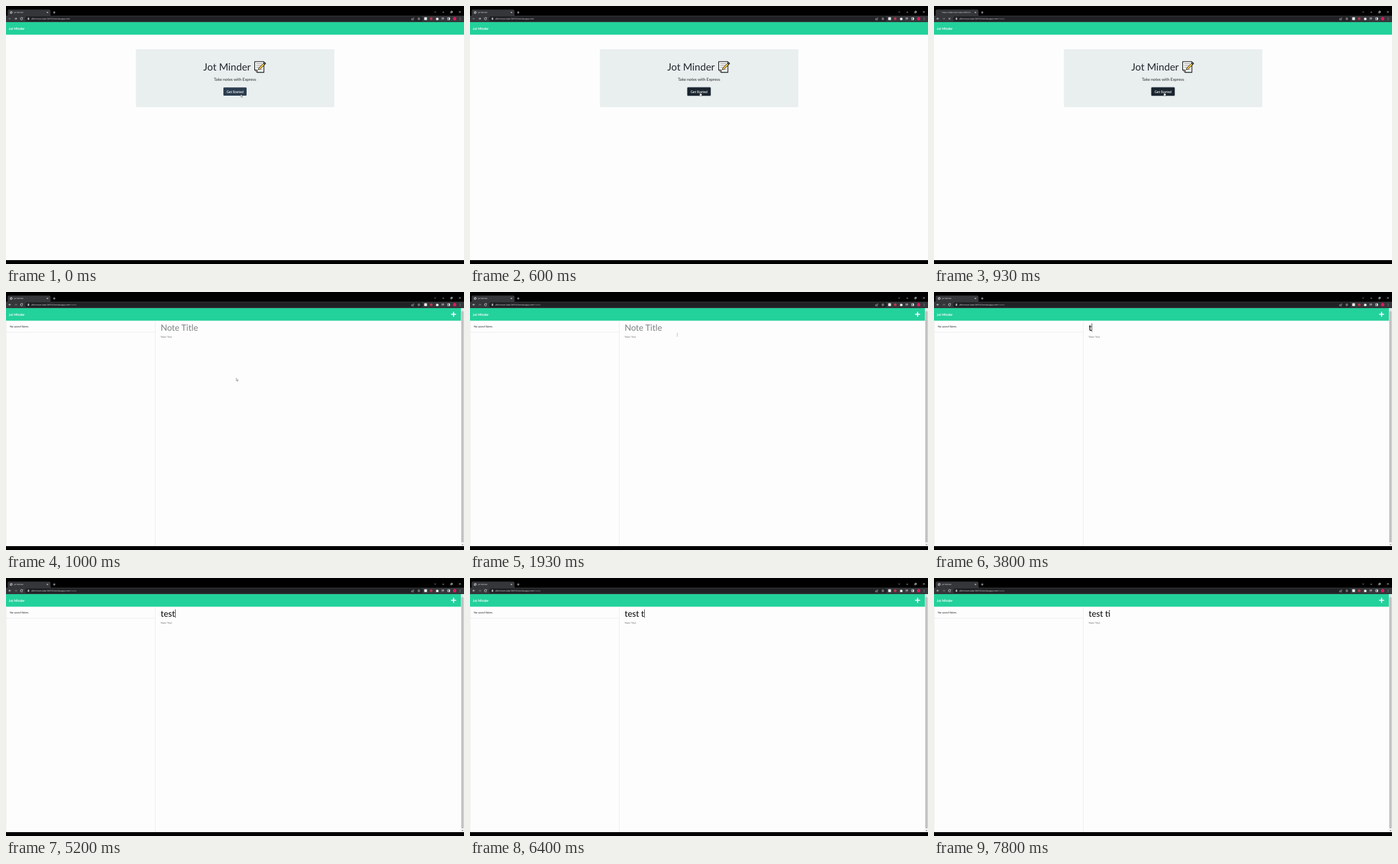
An HTML page for the animation above (8 s loop, 710x400 px).

```html
<!DOCTYPE html>
<html lang="en">
<head>
<meta charset="utf-8">
<title>Jot Minder</title>
<style>
html, body { margin: 0; width: 100%; height: 100%; overflow: hidden; background: #000; }
svg { display: block; width: 710px; height: 400px; }
text { font-family: Lato, sans-serif; text-rendering: geometricPrecision; white-space: pre; }
.ui { font-family: "Open Sans", sans-serif; fill: #e8eaed; }
.line { fill: none; stroke: #dfe1e5; stroke-width: .7; }
.dim { opacity: .4; }
.rule { fill: none; stroke: #e2e4e6; stroke-width: .6; }
.hint { fill: #7b7f82; }
</style>
</head>
<body>
<svg viewBox="0 0 710 400">
  <rect width="710" height="400" fill="#000"/>

  <!-- tab strip -->
  <path d="M1 15.5q1.5 0 1.5-1.5V7.500q0-2 2-2h62.500q2 0 2 2V14q0 1.500 1.500 1.500z" fill="#35363a"/>
  <g id="icon" class="line">
    <circle cx="8" cy="10" r="1.7"/>
    <path d="M6.700 11l2.700-2"/>
  </g>
  <text id="tab" class="ui" x="12.400" y="11.100" font-size="3.100"></text>
  <path class="line" d="M63.200 8.800l2.200 2.200m0-2.200l-2.200 2.200M73 10h3.600m-1.800-1.800v3.600"/>
  <g class="line">
    <path d="M664.300 8.800l1.100 1.100 1.100-1.100M676.600 9.700h2.600M702.400 8.100l2.400 2.400m0-2.400l-2.400 2.400"/>
    <path d="M689.400 8.700h2v2h-2zM690.100 8.100h1.900v1.900"/>
  </g>

  <!-- toolbar -->
  <rect y="15" width="710" height="10" fill="#35363a"/>
  <rect x="29.500" y="16" width="617" height="7.800" rx="3.900" fill="#202124"/>
  <path id="back" class="line" d="M7.800 19.700H4.400m1.600-1.700l-1.700 1.700 1.700 1.700"/>
  <path id="forward" class="line" d="M13.200 19.700h3.400m-1.600-1.700l1.700 1.700-1.700 1.700"/>
  <path id="reload" class="line" d="M25.500 18.600a1.800 1.800 0 1 0 .3 1.600m0-2.400v1.300h-1.300"/>
  <path id="stop" class="line" d="M22.600 18.300l2.800 2.800m0-2.800l-2.800 2.800"/>
  <rect x="33.600" y="19.300" width="2.400" height="1.900" rx=".3" fill="#bdc1c6"/>
  <path class="line" d="M34.100 19.300v-.5a.7.700 0 0 1 1.400 0v.5" stroke-width=".4"/>
  <text class="ui" x="39.300" y="21" font-size="3.400">afternoon-lake-94914.herokuapp.com<tspan id="path" fill="#9aa0a6">/notes</tspan></text>
  <g class="line">
    <path d="M629.600 19.200h-.8v2.300h3.200v-.8M630 20.500q.2-1.600 2.300-1.600m-.9-.9l1 .9-1 .9" stroke-width=".5"/>
    <path d="M640 17.900l.5 1.200 1.300.1-1 .9.300 1.300-1.100-.7-1.100.7.300-1.300-1-.9 1.300-.1z" stroke-width=".5"/>
    <path d="M675.300 18.400h3.600m-3.600 1.300h2.400m-2.400 1.300h1.300m1.500.2v-1.900h1" stroke-width=".6"/>
    <path d="M684.500 18.100h3.400v3.200h-3.400z"/>
  </g>
  <rect x="648.400" y="17.600" width="4.200" height="4.200" rx=".4" fill="#f1f3f4"/>
  <circle cx="659.200" cy="19.700" r="2.100" fill="#c3344b"/>
  <path d="M666.700 18.400h1a.8.800 0 0 1 1.500 0h1v1.100a.8.800 0 0 1 0 1.500v.7h-3.500z" fill="#f1f3f4"/>
  <rect x="686.400" y="18" width="1.600" height="3.400" fill="#f1f3f4"/>
  <circle cx="695.500" cy="19.700" r="2.600" fill="#d81b60"/>
  <g fill="#dfe1e5">
    <circle cx="704" cy="18.200" r=".45"/><circle cx="704" cy="19.700" r=".45"/><circle cx="704" cy="21.200" r=".45"/>
  </g>

  <!-- page -->
  <rect y="25" width="710" height="369" fill="#fdfdfd"/>
  <rect y="25" width="710" height="19.500" fill="#23d19b"/>
  <text x="4.300" y="36.600" font-size="5.200" fill="#fff" stroke="#fff" stroke-width=".1">Jot Minder</text>

  <g id="home">
    <rect x="201.300" y="67" width="307.600" height="89.800" rx="1.200" fill="#e9efef"/>
    <text x="305.800" y="99.700" font-size="15.530" fill="#212529">Jot Minder</text>
    <g stroke="#111" stroke-width="1.100" stroke-linejoin="round">
      <path d="M385.500 86.200h14.300v16.700h-10.600l-3.700-3.700z" fill="#f7f7f7"/>
      <path d="M385.500 99.200h3.700v3.700" fill="#ddd"/>
      <path d="M388 89.500h9M388 92.300h8M388 95.100h5M394 98.500h3.500" stroke="#8a8a8a" stroke-width=".8"/>
      <path d="M391 98.900l1-2.900 8.200-8 1.900 1.900-8.200 8z" fill="#ffc83d" stroke-width=".8"/>
      <path d="M399 89.200l1.300-1.300q.9-.8 1.800.1t0 1.800l-1.300 1.300z" fill="#555" stroke-width=".7"/>
    </g>
    <text x="355" y="115.900" font-size="6.240" fill="#212529" text-anchor="middle">Take notes with Express</text>
    <rect id="ring" x="336.300" y="125.500" width="37.400" height="14.300" rx="1.900" fill="#98a3ad"/>
    <rect id="button" x="337" y="126.200" width="36" height="12.900" rx="1.300"/>
    <text x="355" y="134.500" font-size="5.200" fill="#fff" stroke="#fff" stroke-width=".08" text-anchor="middle">Get Started</text>
  </g>

  <g id="notes">
    <path d="M690.600 34.500h6.400M693.800 31.300v6.400" stroke="#fff" stroke-width="1.700" stroke-linecap="round"/>
    <path class="rule" d="M.3 44.500V394M231.300 44.500V394M0 62.300h231.300"/>
    <text x="5.900" y="54.900" font-size="4.160" fill="#212529">No saved Notes</text>
    <text id="title" x="239.700" y="60.200" font-size="13.310"></text>
    <text class="hint" x="239.700" y="71" font-size="4.160">Note Text</text>
    <rect id="caret" y="48.600" width=".7" height="13" fill="#111"/>
    <rect x="705.300" y="25" width="4.700" height="369" fill="#f1f1f1"/>
    <rect x="705.800" y="29.600" width="3.700" height="358.400" fill="#c1c1c1"/>
    <path d="M706.600 28l1.100-1.200 1.100 1.200z" fill="#a3a3a3"/>
    <path d="M706.600 391l1.100 1.200 1.100-1.200z" fill="#505050"/>
  </g>

  <!-- pointers, each with its hot spot at 0,0 -->
  <path id="arrow" d="M0 0v4.200l1-.9.700 1.500.7-.3-.7-1.500h1.300z" fill="#fff" stroke="#333" stroke-width=".4"/>
  <path id="hand" d="M-.5 0h1v2l1.900.5-.2 2-.6 1h-1.900l-1.300-2 .5-.3.600.5z" fill="#fff" stroke="#333" stroke-width=".4"/>
  <path id="beam" d="M-.7-2.200H.7M0-2.200v4.400M-.7 2.200H.7" fill="none" stroke="#777" stroke-width=".4"/>
</svg>
<script>
const LOOP = 8000, BLINK = 530, OPEN = 1000;
const $ = id => document.getElementById(id);
const show = (id, on) => $(id).style.display = on ? '' : 'none';
const dim = (id, on) => $(id).classList.toggle('dim', on);

// [time, title after the key press]
const keys = [
  [2270, ''], [3730, 't'], [3860, 'te'], [3930, 'tes'], [4130, 'test'],
  [6060, 'test '], [6400, 'test t'], [6460, 'test ti'], [6660, 'test tit'],
  [6930, 'test titl'], [7660, 'test tit'], [7800, 'test ti']
];
const ERASE = 7460;

// [time, x, y] of the pointer
const route = [
  [0, 364, 137], [60, 363, 137], [260, 357, 134], [1190, 357, 133.600], [1260, 358, 84],
  [1460, 358, 84], [2260, 300, 56], [2460, 290, 56]
];

function place(t) {
  const i = Math.max(1, route.findIndex(p => p[0] > t));
  const [t0, x0, y0] = route[i - 1], [t1, x1, y1] = route[i];
  const k = (t - t0) / (t1 - t0), s = k * k * (3 - 2 * k);
  return `translate(${x0 + (x1 - x0) * s} ${y0 + (y1 - y0) * s})`;
}

function pointer(t) {
  const kind = t < 60 ? 'arrow' : t < OPEN ? 'hand' : t < 1260 ? 'arrow' : t < 2460 ? 'beam' : '';
  for (const id of ['arrow', 'hand', 'beam']) show(id, id === kind);
  if (kind) $(kind).setAttribute('transform', place(kind === 'arrow' && t >= OPEN ? 1000 : t));
}

function chrome(t) {
  const left = t >= 800, busy = left && t < OPEN;
  $('tab').textContent = busy ? 'https://afternoon-lake-94914.h' : 'Jot Minder';
  show('icon', !busy);
  show('stop', busy);
  show('reload', !busy);
  show('path', left);
  dim('back', !left);
  dim('forward', left);
}

function typing(t) {
  const last = keys.filter(k => k[0] <= t).pop();
  const word = last ? last[1] : '', title = $('title');
  title.textContent = word || 'Note Title';
  title.setAttribute('class', word ? '' : 'hint');
  const lit = last && t < ERASE && Math.floor((t - last[0]) / BLINK) % 2 === 0;
  show('caret', lit);
  if (lit) $('caret').setAttribute('x', 239.700 + (word ? title.getComputedTextLength() : 0));
}

function draw(now) {
  const t = now % LOOP;
  show('home', t < OPEN);
  show('notes', t >= OPEN);
  show('ring', t >= 600);
  $('button').setAttribute('fill', t < 60 ? '#2c3e50' : '#1a252f');
  chrome(t);
  typing(t);
  pointer(t);
  requestAnimationFrame(draw);
}
draw(0);
</script>
</body>
</html>
```
